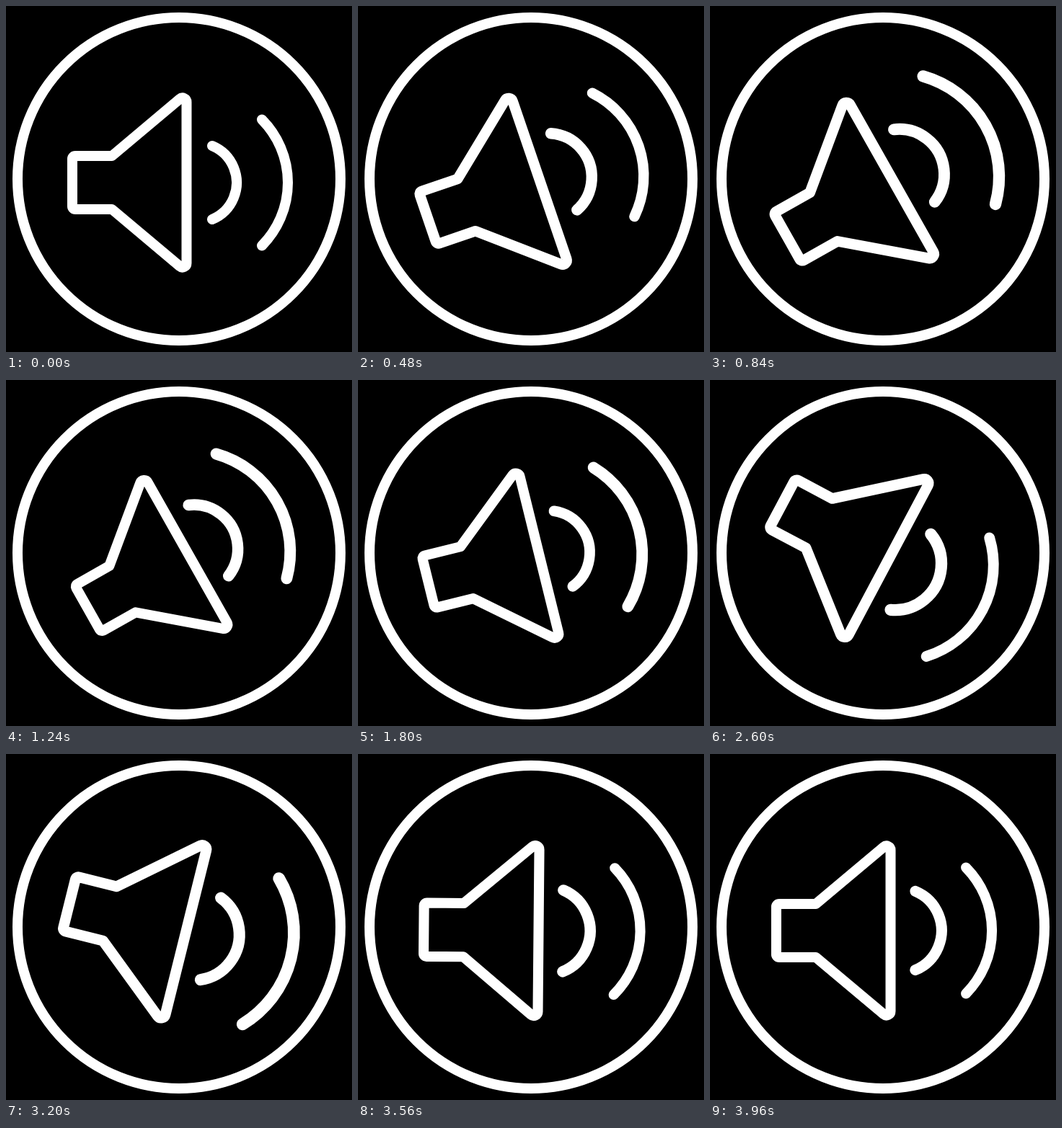
An HTML page with a canvas that plays this animation: 480x480 px, repeating every 4000 ms.

```html
<!DOCTYPE html>
<html lang="en">
<head>
<meta charset="utf-8">
<title>Speaker</title>
<style>
  html, body { margin: 0; width: 100%; height: 100%; overflow: hidden; background: #000; }
  canvas { display: block; width: 480px; height: 480px; }
</style>
</head>
<body>
<canvas id="stage" width="480" height="480"></canvas>
<script>
const ctx = document.getElementById('stage').getContext('2d');
const LOOP = 4000, STEP = 40;
const CENTER = 240;
const MID_Y = 245;

const ramp = (t, start, end) => Math.min(1, Math.max(0, (t - start) / (end - start)));
const cubic = p => p < 0.5 ? 4 * p ** 3 : 1 - 4 * (1 - p) ** 3;
const smooth = p => p * p * (3 - 2 * p);

// Repeating bump: rises between a and b, falls between c and d (fractions of a period).
function pulse(t, count, a, b, c, d) {
  const phase = (t * count / LOOP) % 1;
  return smooth(ramp(phase, a, b)) - smooth(ramp(phase, c, d));
}

// Tilts up, swings down, returns to level.
function tilt(t) {
  return -29.5 * cubic(ramp(t, 0, 870))
       + 57.5 * cubic(ramp(t, 1335, 2475))
       - 28 * cubic(ramp(t, 2660, 3740));
}

function scaleAbout(x, y, scale) {
  ctx.translate(x, y);
  ctx.scale(scale, scale);
  ctx.translate(-x, -y);
}

function speaker() {
  ctx.beginPath();
  ctx.moveTo(92, MID_Y);
  ctx.arcTo(92, 208, 147, 208, 4);
  ctx.lineTo(147, 208);
  ctx.arcTo(250.5, 121, 250.5, MID_Y, 5.7);
  ctx.arcTo(250.5, 369, 147, 282, 5.7);
  ctx.lineTo(147, 282);
  ctx.arcTo(92, 282, 92, MID_Y, 4);
  ctx.closePath();
  ctx.stroke();
}

// Each wave grows around the middle of its own box.
function wave(left, right, halfHeight, scale) {
  const depth = right - left;
  const radius = (halfHeight ** 2 + depth ** 2) / (2 * depth);
  const angle = Math.asin(halfHeight / radius);
  ctx.save();
  scaleAbout((left + right) / 2, MID_Y, scale);
  ctx.beginPath();
  ctx.arc(right - radius, MID_Y, radius, -angle, angle);
  ctx.stroke();
  ctx.restore();
}

function draw(t) {
  ctx.fillStyle = '#000';
  ctx.fillRect(0, 0, 480, 480);
  ctx.strokeStyle = '#fff';
  ctx.lineCap = ctx.lineJoin = 'round';
  ctx.lineWidth = 14;

  ctx.beginPath();
  ctx.arc(CENTER, CENTER, 224, 0, 2 * Math.PI);
  ctx.stroke();

  ctx.save();
  ctx.translate(CENTER, CENTER);
  ctx.rotate(tilt(t) * Math.PI / 180);
  ctx.translate(-CENTER, -CENTER);
  scaleAbout(CENTER, CENTER, 1 + 0.05 * pulse(t, 7, 0.17, 0.5, 0.78, 0.94));
  speaker();
  wave(286, 320, 51, 1 + 0.11 * pulse(t, 12, 0, 0.8, 0.8, 1));
  wave(355, 391, 87.5, 1 + 0.135 * pulse(t, 8, 0.15, 0.4, 0.6, 0.9));
  ctx.restore();
}

function frame() {
  draw(Math.floor(performance.now() % LOOP / STEP) * STEP);
  requestAnimationFrame(frame);
}
frame();
</script>
</body>
</html>
```
